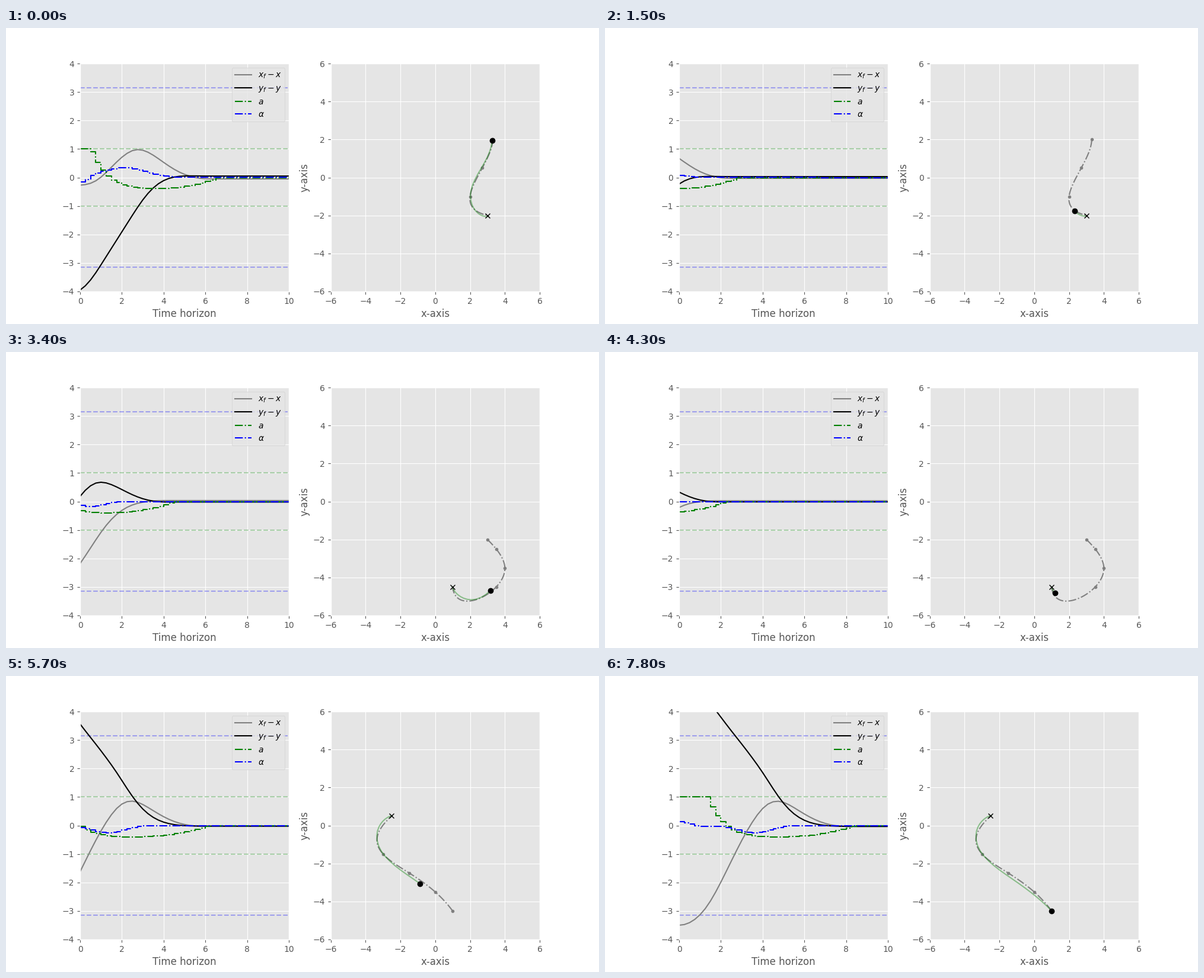
A matplotlib script that plays this animation: 1000 px wide and 500 px high, repeating every 7900 ms.

```python
import numpy as np
import matplotlib.pyplot as plt
from matplotlib.animation import FuncAnimation

DT = 0.25
T = np.arange(41) * DT          # prediction horizon
CLOCK = np.arange(80) * DT      # time since a leg began
FRAMES = 79

plt.style.use("ggplot")


def spline(points, stretch=1.0):
    """Cubic spline over chord length; stretch lengthens the last interval."""
    p = np.array(points, float)
    h = np.hypot(*np.diff(p, axis=0).T)
    h[-1] *= stretch
    u = np.r_[0, np.cumsum(h)] / h.sum()

    def basis(w):
        cols = [w ** k for k in range(4)]
        cols += [np.clip(w - knot, 0, None) ** 3 for knot in u[2:-2]]
        return np.stack(cols, axis=1)

    return basis(np.linspace(0, 1, 400)) @ np.linalg.solve(basis(u), p)


def brake(t, hold, fall):
    """Full throttle, a quick drop into braking, then a slow release."""
    drop = np.minimum(1, -0.44 + 1.44 * np.exp((hold - t) / 0.75))
    return drop * (1 - np.clip((t - hold) / fall, 0, 1) ** 4.2)


def bumps(t, shapes):
    """Sum of bell curves given as (centre, width, height)."""
    return sum(h * np.exp(-0.5 * ((t - c) / w) ** 2) for c, w, h in shapes)


class Leg:
    def __init__(self, stops, drive, hold, fall, turns, speed=0):
        self.stops = np.array(stops, float)
        self.goal = self.stops[-1]
        self.route = spline(stops, stretch=1.2)
        self.acc = brake(CLOCK, hold, fall)
        self.steer = bumps(CLOCK, turns)

        # integrate the acceleration into progress along the driven curve
        v = speed + DT * np.r_[0, np.cumsum(self.acc)[:-1]]
        v = np.where(CLOCK < hold + fall, np.clip(v, 0, None), 0)
        s = np.r_[0, np.cumsum((v[1:] + v[:-1]) / 2 * DT)]
        self.progress = s / s[-1]
        curve = spline(drive)
        arc = np.r_[0, np.cumsum(np.hypot(*np.diff(curve, axis=0).T))]
        at = self.progress * arc[-1]
        self.pos = np.stack([np.interp(at, arc, c) for c in curve.T])
        self.miss = curve[-1] - self.goal

    def plan(self, k):
        """Predicted positions and inputs over the horizon at step k."""
        view = slice(k, k + len(T))
        healed = 1 - np.exp(-k * DT / 7)
        shift = np.outer(self.miss, self.progress[view] ** 4) * healed
        return self.pos[:, view] - shift, self.acc[view], self.steer[view]


first = Leg(
    stops=[(3.3, 2), (2.7, 0.5), (2, -1), (3, -2)],
    drive=[(3.27, 1.95), (2.98, 1.05), (2.27, -0.13), (2.02, -1.01),
           (2.23, -1.65), (2.67, -2), (3.05, -2.05)],
    hold=0.45, fall=6.1, speed=0.5,
    turns=[(0, 0.3, -0.2), (2, 1, 0.35)])

second = Leg(
    stops=[(3, -2), (3.5, -2.5), (4, -3.5), (3.5, -4.5), (1, -4.5)],
    drive=[(3, -2), (3.5, -2.13), (3.88, -2.58), (3.95, -3.32),
           (3.24, -4.62), (2.15, -5.17), (1.37, -4.96), (0.95, -4.47)],
    hold=1.05, fall=6.4,
    turns=[(1.55, 0.45, 0.52), (3.4, 0.6, -0.18)])

third = Leg(
    stops=[(1, -4.5), (0, -3.5), (-1.5, -2.5), (-3, -1.5), (-2.5, 0.5)],
    drive=[(1, -4.5), (0.13, -3.76), (-1.27, -2.81), (-2.64, -1.85),
           (-3.26, -1.05), (-3.32, -0.31), (-2.96, 0.27), (-2.46, 0.53)],
    hold=1.3, fall=7.05,
    turns=[(0, 0.35, 0.13), (1.25, 0.4, -0.03), (3.5, 0.75, -0.26)])

# frame at which each leg begins; the last one starts over
SCHEDULE = [(0, first), (22, second), (48, third), (78, third)]

fig, (left, right) = plt.subplots(1, 2, figsize=(10, 5), dpi=100)

for level, color in ((1, "green"), (np.pi, "blue")):
    for sign in (1, -1):
        left.plot([0, 10], [sign * level] * 2, "--", color=color, alpha=0.3)
err_x, = left.plot([], [], color="grey", label="$x_f-x$")
err_y, = left.plot([], [], color="black", label="$y_f-y$")
acc, = left.plot([], [], "-.", color="green", drawstyle="steps-post",
                 label="$a$")
steer, = left.plot([], [], "-.", color="blue", drawstyle="steps-post",
                   label=r"$\alpha$")
left.set(xlim=(0, 10), ylim=(-4, 4), xlabel="Time horizon")
left.legend(loc="upper right")

route, = right.plot([], [], "-.", color="grey")
stops, = right.plot([], [], ".", color="grey")
ahead, = right.plot([], [], color="green", alpha=0.4)
goal, = right.plot([], [], "x", color="black")
car, = right.plot([], [], "o", color="black")
ticks = range(-6, 7, 2)
right.set(xlim=(-6, 6), ylim=(-6, 6), xticks=ticks, yticks=ticks,
          xlabel="x-axis", ylabel="y-axis")


def update(frame):
    start, leg = [s for s in SCHEDULE if s[0] <= frame][-1]
    pos, push, turn = leg.plan(frame - start)
    error = leg.goal[:, None] - pos
    for line, values in zip((err_x, err_y, acc, steer), (*error, push, turn)):
        line.set_data(T, values)
    route.set_data(*leg.route.T)
    stops.set_data(*leg.stops[:-1].T)
    ahead.set_data(*pos)
    goal.set_data(*leg.goal[:, None])
    car.set_data(*pos[:, :1])
    return err_x, err_y, acc, steer, route, stops, ahead, goal, car


anim = FuncAnimation(fig, update, frames=FRAMES, interval=100,
                     repeat=True, repeat_delay=0, blit=False)
plt.show()
```
